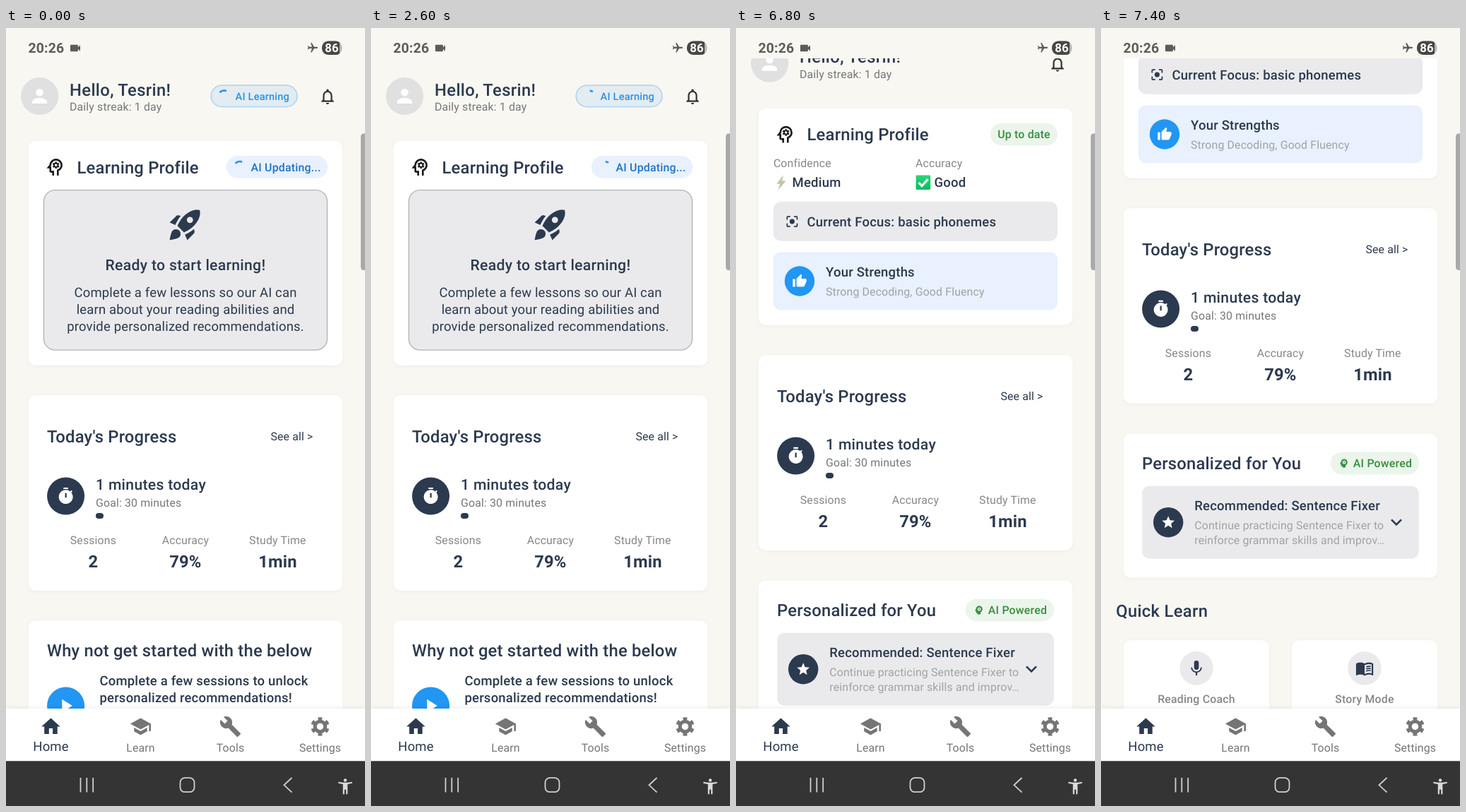
These frames come from a looping animation (508x1102 px, 8000 ms). An HTML page:

```html
<!DOCTYPE html>
<html lang="en">
<head>
<meta charset="utf-8">
<title>Learning dashboard</title>
<style>
html, body { margin: 0; width: 100%; height: 100%; overflow: hidden; background: #f8f7f2; }
svg { display: block; }
#stage { width: 508px; height: 1102px; font-family: Roboto, "Noto Sans", sans-serif; }
text { fill: #2c3a4f; white-space: pre; letter-spacing: .15px; text-rendering: geometricPrecision; }
.t18, .t16, .t14, .t12m, .t11 { font-weight: 500; letter-spacing: .2px; }
.t18 { font-size: 23.81px; }
.t16 { font-size: 21.17px; letter-spacing: .3px; }
.t14, .b14 { font-size: 18.52px; }
.t12m, .b12 { font-size: 15.875px; }
.t11 { font-size: 14.55px; }
.bold { font-weight: 700; font-size: 23.81px; }
.mid { text-anchor: middle; }
.dim { fill: #858788; }
.sub { fill: #757779; }
.pale { fill: #a0a2a5; }
.card { fill: #fff; filter: drop-shadow(0 1.5px 2.5px rgba(0, 0, 0, .045)); }
.grey { fill: #eaeaec; }
.sky { fill: #e8f1fd; }
.mint { fill: #ebf5eb; }
.navy { fill: #2c3a4f; }
.blue { fill: #2196f3; }
.white { fill: #fff; }
.green { fill: #388e3c; }
.idle { fill: #757575; color: #757575; }
#sys { fill: none; stroke: #d0d0d0; stroke-width: 1.8; }
</style>
</head>
<body>
<svg id="stage" viewBox="0 0 508 1102">
<defs>
  <clipPath id="view"><rect y="43" width="508" height="921"/></clipPath>
  <clipPath id="charge"><rect x="447" y="18" width="25" height="21"/></clipPath>
  <linearGradient id="tick" x2="0" y2="1"><stop stop-color="#2bd67b"/><stop offset="1" stop-color="#06bb5f"/></linearGradient>
  <linearGradient id="zap" x2="0" y2="1"><stop stop-color="#c9cf9f"/><stop offset="1" stop-color="#bcb9ae"/></linearGradient>
  <path id="arc" fill="none" stroke="#2196f3" stroke-width="2.65" stroke-linecap="square"/>

  <symbol id="person" viewBox="0 0 24 24"><circle cx="12" cy="8" r="4"/><path d="M12 14c-2.67 0-8 1.34-8 4v2h16v-2c0-2.66-5.33-4-8-4z"/></symbol>
  <symbol id="bell" viewBox="0 0 24 24"><path d="M12 22c1.1 0 2-.9 2-2h-4c0 1.1.89 2 2 2zm6-6v-5c0-3.07-1.64-5.64-4.5-6.32V4c0-.83-.67-1.5-1.5-1.5s-1.5.67-1.5 1.5v.68C7.63 5.36 6 7.92 6 11v5l-2 2v1h16v-1l-2-2zm-2 1H8v-6c0-2.48 1.51-4.5 4-4.5s4 2.02 4 4.5v6z"/></symbol>
  <symbol id="mind" viewBox="0 0 24 24"><g fill="none" stroke="#1a1a1a">
    <path stroke-width="2" d="M15 21v-5.4c2.4-1 4-3 4-5.6a6 6 0 0 0-12 0L5.1 12.4H7V16c0 .6.4 1 1 1h2v4"/>
    <circle cx="13" cy="10" r="2.1" stroke-width="1.5"/>
    <circle cx="13" cy="10" r="3.2" stroke-width="1.2" pathLength="6" stroke-dasharray=".5" stroke-dashoffset="-.25"/></g></symbol>
  <symbol id="mindfull" viewBox="0 0 24 24">
    <path d="M13 3C9.25 3 6.2 5.94 6.02 9.64L4.1 12.2c-.25.33-.01.8.4.8H6v3c0 1.1.9 2 2 2h1v3h7v-4.68c2.36-1.12 4-3.53 4-6.32 0-3.87-3.13-7-7-7z"/>
    <g fill="none" stroke="#ebf5eb"><circle cx="13" cy="10" r="2.4" stroke-width="2"/>
    <circle cx="13" cy="10" r="3.6" stroke-width="1.2" pathLength="6" stroke-dasharray=".5" stroke-dashoffset="-.25"/></g></symbol>
  <symbol id="rocket" viewBox="0 0 24 24"><path fill-rule="evenodd" d="M9.19 6.35c-2.04 2.29-3.44 5.58-3.57 5.89L2 10.69l4.05-4.05c.47-.47 1.15-.68 1.81-.55l1.33.26zM11.17 17s3.74-1.55 5.89-3.7c5.4-5.4 4.5-9.62 4.21-10.57-.95-.3-5.17-1.19-10.57 4.21C8.55 9.09 7 12.83 7 12.83L11.17 17zm6.48-2.19c-2.29 2.04-5.58 3.44-5.89 3.57L13.31 22l4.05-4.05c.47-.47.68-1.15.55-1.81l-.26-1.33zM9 18c0 .83-.34 1.58-.88 2.12C6.94 21.3 2 22 2 22s.7-4.94 1.88-6.12A3 3 0 0 1 9 18zm4-9a2 2 0 1 1 4 0 2 2 0 0 1-4 0z"/></symbol>
  <symbol id="timer" viewBox="0 0 24 24"><path fill-rule="evenodd" d="M15 1H9v2h6zM11 14h2V8h-2zM19.03 7.39l1.42-1.42c-.43-.51-.9-.99-1.41-1.41l-1.42 1.42A9 9 0 1 0 19.03 7.39z"/></symbol>
  <symbol id="play" viewBox="0 0 24 24"><path d="M8 5v14l11-7z"/></symbol>
  <symbol id="focus" viewBox="0 0 24 24"><circle cx="12" cy="12" r="4"/><path fill="none" stroke="#2c3a4f" stroke-width="2" d="M4 9V5q0-1 1-1h4M15 4h4q1 0 1 1v4M20 15v4q0 1-1 1h-4M9 20H5q-1 0-1-1v-4"/></symbol>
  <symbol id="thumb" viewBox="0 0 24 24"><path d="M1 21h4V9H1v12zm22-11c0-1.1-.9-2-2-2h-6.31l.95-4.57.03-.32c0-.41-.17-.79-.44-1.06L14.17 1 7.59 7.59C7.22 7.95 7 8.45 7 9v10c0 1.1.9 2 2 2h9c.83 0 1.54-.5 1.84-1.22l3.02-7.05c.09-.23.14-.47.14-.73v-2z"/></symbol>
  <symbol id="star" viewBox="0 0 24 24"><path d="M12 17.27L18.18 21l-1.64-7.03L22 9.24l-7.19-.61L12 2 9.19 8.63 2 9.24l5.46 4.73L5.82 21z"/></symbol>
  <symbol id="more" viewBox="0 0 24 24"><path d="M16.59 8.59L12 13.17 7.41 8.59 6 10l6 6 6-6z"/></symbol>
  <symbol id="mic" viewBox="0 0 24 24"><rect x="9" y="2" width="6" height="12" rx="3"/><path d="M17.3 11c0 3-2.54 5.1-5.3 5.1S6.7 14 6.7 11H5c0 3.41 2.72 6.23 6 6.72V21h2v-3.28c3.28-.48 6-3.3 6-6.72z"/></symbol>
  <symbol id="book" viewBox="0 0 24 24"><path fill-rule="evenodd" d="M23 6c-1.4-1.1-3.5-1.5-5.5-1.5S13.45 4.9 12 6c-1.45-1.1-3.55-1.5-5.5-1.5S2.45 4.9 1 6v14.6q.1.6.75.5C3.1 20.45 5.05 20 6.5 20c1.95 0 4.05.4 5.5 1.5 1.35-.85 3.8-1.5 5.5-1.5 1.65 0 3.35.3 4.75 1.05q.65.1.75-.5zM21 18.5c-1.1-.35-2.3-.5-3.5-.5-1.7 0-4.15.65-5.5 1.5V8c1.35-.85 3.8-1.5 5.5-1.5 1.2 0 2.4.15 3.5.5z"/><path fill="none" stroke="#2c3a4f" stroke-width="1.5" d="M14 10.2q2.8-1.2 6-.6M14 12.9q2.8-1.2 6-.6M14 15.6q2.8-1.2 6-.6"/></symbol>
  <symbol id="home" viewBox="0 0 24 24"><path d="M10 20v-6h4v6h5v-8h3L12 3 2 12h3v8z"/></symbol>
  <symbol id="school" viewBox="0 0 24 24"><path d="M5 13.18v4L12 21l7-3.82v-4L12 17zM12 3L1 9l11 6 9-4.91V17h2V9z"/></symbol>
  <symbol id="wrench" viewBox="0 0 24 24"><path d="M22.7 19l-9.1-9.1c.9-2.3.4-5-1.5-6.9-2-2-5-2.4-7.4-1.3L9 6 6 9 1.6 4.7C.4 7.1.9 10.1 2.9 12.1c1.9 1.9 4.6 2.4 6.9 1.5l9.1 9.1c.4.4 1 .4 1.4 0l2.3-2.3c.5-.4.5-1.1.1-1.4z"/></symbol>
  <symbol id="gear" viewBox="0 0 24 24"><g fill="none" stroke="currentColor"><circle cx="12" cy="12" r="5.5" stroke-width="3.8"/>
    <circle cx="12" cy="12" r="8.4" stroke-width="3.2" pathLength="6" stroke-dasharray=".5" stroke-dashoffset="-.25"/></g></symbol>
  <symbol id="video" viewBox="0 0 24 24"><path d="M17 10.5V7c0-.55-.45-1-1-1H4c-.55 0-1 .45-1 1v10c0 .55.45 1 1 1h12c.55 0 1-.45 1-1v-3.5l4 4v-11z"/></symbol>
  <symbol id="plane" viewBox="0 0 24 24"><path d="M21 16v-2l-8-5V3.5a1.5 1.5 0 0 0-3 0V9l-8 5v2l8-2.5V19l-2 1.5V22l3.5-1 3.5 1v-1.5L13 19v-5.5z"/></symbol>
  <symbol id="access" viewBox="0 0 24 24"><circle cx="12" cy="4" r="2"/><path d="M20.5 6c-2.61.7-5.67 1-8.5 1s-5.89-.3-8.5-1L3 8c1.86.5 4 .83 6 1v13h2v-6h2v6h2V9c2-.17 4.14-.5 6-1z"/></symbol>
</defs>

<rect width="508" height="1102" fill="#f8f7f2"/>

<g clip-path="url(#view)"><g id="page">
  <circle cx="47.6" cy="96.5" r="26.5" fill="#e0e0e0"/>
  <use href="#person" class="white" x="31.7" y="80.6" width="31.75" height="31.75"/>
  <text class="t18" style="letter-spacing:.35px" x="90" y="95.6">Hello, Tesrin!</text>
  <text class="b12 sub" x="90" y="117">Daily streak: 1 day</text>
  <use href="#bell" fill="#333" x="441.8" y="83.8" width="26.5" height="26.5"/>

  <rect id="profile" class="card" x="31.75" y="160" width="444.5" height="318" rx="10.6"/>
  <use href="#mind" x="53.5" y="181.1" width="31.75" height="31.75"/>
  <text class="t18" x="100.5" y="205.6">Learning Profile</text>

  <g id="before">
    <rect x="290.2" y="81.2" width="121.8" height="30.4" rx="15.2" fill="#e3ecf0" stroke="#a3cdf0" stroke-width="1.3"/>
    <use href="#arc" x="308.5" y="96.5"/>
    <text class="t11" x="324.6" y="101.6" style="fill:#2b91e4">AI Learning</text>
    <rect class="sky" x="312" y="181" width="143" height="31.7" rx="15.85"/>
    <use href="#arc" x="330.7" y="197"/>
    <text class="t12m" x="346.5" y="202.5" style="fill:#2074c4">AI Updating...</text>

    <rect class="grey" x="53.5" y="229.6" width="401" height="226.6" rx="15.9" stroke="#b0b3b6" stroke-width="1.3"/>
    <use href="#rocket" class="navy" x="227.2" y="252" width="52.9" height="52.9"/>
    <text class="t16 mid" x="254" y="343">Ready to start learning!</text>
    <g class="mid">
      <text class="b14" x="254" y="381">Complete a few lessons so our AI can</text>
      <text class="b14" x="254" y="405">learn about your reading abilities and</text>
      <text class="b14" x="254" y="429">provide personalized recommendations.</text>
    </g>

    <rect class="card" x="31.75" y="839.5" width="444.5" height="204" rx="10.6"/>
    <text class="t18" x="58" y="889.6">Why not get started with the below</text>
    <circle class="blue" cx="84.6" cy="960" r="26.5"/>
    <use href="#play" class="white" x="68.7" y="944.1" width="31.75" height="31.75"/>
    <text class="t14" x="132.4" y="931">Complete a few sessions to unlock</text>
    <text class="t14" x="132.4" y="955">personalized recommendations!</text>
  </g>

  <g id="after">
    <rect class="mint" x="360" y="181" width="95" height="31.7" rx="15.85"/>
    <text class="t12m green mid" x="407.5" y="202.5" style="fill:#388e3c">Up to date</text>
    <text class="b12 dim" x="52.9" y="243.8">Confidence</text>
    <text class="b12 dim" x="254" y="243.8">Accuracy</text>
    <path fill="url(#zap)" d="M67 254.5l-9.5 12.5h5l-3 9 11-13.2h-5.2z"/>
    <text class="t14" x="79.5" y="271.5">Medium</text>
    <rect x="254.6" y="254.8" width="20.6" height="20.6" rx="1.5" fill="url(#tick)"/>
    <path d="M258.6 265.4l4.4 4.6 8.6-9.6" fill="none" stroke="#fff" stroke-width="3.2"/>
    <text class="t14" x="280.4" y="271.5">Good</text>

    <rect class="grey" x="52.9" y="292.5" width="402.1" height="55.5" rx="10.6"/>
    <use href="#focus" class="navy" x="68.8" y="309.8" width="21.2" height="21.2"/>
    <text class="t14" x="100.4" y="327">Current Focus: basic phonemes</text>

    <rect class="sky" x="52.9" y="363.8" width="402.1" height="82" rx="10.6"/>
    <circle class="blue" cx="90" cy="404.8" r="21.2"/>
    <use href="#thumb" class="white" x="79.4" y="394.2" width="21.2" height="21.2"/>
    <text class="t14" x="127" y="398.6">Your Strengths</text>
    <text class="b12 pale" x="127" y="425">Strong Decoding, Good Fluency</text>

    <rect class="card" x="31.75" y="829" width="444.5" height="204" rx="10.6"/>
    <text class="t18" x="58" y="879.4">Personalized for You</text>
    <rect class="mint" x="325" y="855" width="125" height="31.7" rx="15.85"/>
    <use href="#mindfull" class="green" x="335.5" y="862.9" width="15.9" height="15.9"/>
    <text class="t12m" x="356.8" y="876.3" style="fill:#388e3c">AI Powered</text>
    <rect class="grey" x="58.2" y="903" width="391.6" height="103" rx="10.6"/>
    <circle class="navy" cx="95.2" cy="954.5" r="21.2"/>
    <use href="#star" class="white" x="84.6" y="943.9" width="21.2" height="21.2"/>
    <text class="t14" x="132.3" y="937.4">Recommended: Sentence Fixer</text>
    <text class="b12 pale" x="132.3" y="964">Continue practicing Sentence Fixer to</text>
    <text class="b12 pale" x="132.3" y="985.3">reinforce grammar skills and improv…</text>
    <use href="#more" class="navy" x="402.1" y="938.4" width="31.75" height="31.75"/>

    <text class="t18" style="letter-spacing:.3px" x="21.2" y="1088.4">Quick Learn</text>
    <rect class="card" x="31.75" y="1121.5" width="206.4" height="120" rx="10.6"/>
    <rect class="card" x="269.9" y="1121.5" width="206.4" height="120" rx="10.6"/>
    <circle class="grey" cx="135" cy="1161.2" r="23.8"/>
    <circle class="grey" cx="373" cy="1161.2" r="23.8"/>
    <use href="#mic" class="navy" x="121.8" y="1148" width="26.5" height="26.5"/>
    <use href="#book" class="navy" x="359.8" y="1148" width="26.5" height="26.5"/>
    <text class="t12m dim mid" x="135" y="1210.3">Reading Coach</text>
    <text class="t12m dim mid" x="373" y="1210.3">Story Mode</text>
  </g>

  <g id="progress">
    <rect class="card" x="31.75" y="520.3" width="444.5" height="276.7" rx="10.6"/>
    <text class="t18" x="58" y="587.2">Today's Progress</text>
    <text class="b12" x="374.4" y="584">See all &gt;</text>
    <circle class="navy" cx="84.6" cy="663" r="26.5"/>
    <use href="#timer" class="white" x="71.4" y="649.8" width="26.5" height="26.5"/>
    <text class="t16" x="127" y="654.4">1 minutes today</text>
    <text class="b12 sub" x="127" y="678">Goal: 30 minutes</text>
    <rect class="navy" x="127" y="687" width="11" height="8" rx="4"/>
    <g class="mid">
      <text class="b12 dim" x="123.4" y="731.2">Sessions</text>
      <text class="b12 dim" x="253.9" y="731.2">Accuracy</text>
      <text class="b12 dim" x="384.4" y="731.2">Study Time</text>
      <text class="bold" x="123.4" y="764.3">2</text>
      <text class="bold" x="253.9" y="764.3">79%</text>
      <text class="bold" x="384.4" y="764.3">1min</text>
    </g>
  </g>
</g></g>

<g fill="#5d5c59">
  <text x="31.5" y="35" style="font-size:19.4px;font-weight:700;fill:#5d5c59">20:26</text>
  <use href="#video" x="88.7" y="19.2" width="18.6" height="18.6"/>
  <use href="#plane" x="425.5" y="19.7" width="17" height="17" transform="rotate(90 434 28.2)"/>
  <rect x="447" y="18.5" width="28.5" height="19.5" rx="9" fill="#b9b8b4"/>
  <rect x="447" y="18.5" width="28.5" height="19.5" rx="9" fill="#484846" clip-path="url(#charge)"/>
  <text class="mid" x="461" y="34.3" style="font-size:16.8px;font-weight:700;fill:#fff">86</text>
</g>

<rect y="964" width="508" height="75" fill="#fff" style="filter:drop-shadow(0 -1px 3px rgba(0,0,0,.07))"/>
<use href="#home" class="navy" x="47.6" y="973.6" width="31.75" height="31.75"/>
<g class="idle">
  <use href="#school" x="174.6" y="973.6" width="31.75" height="31.75"/>
  <use href="#wrench" x="301.6" y="973.6" width="31.75" height="31.75"/>
  <use href="#gear" x="428.6" y="973.6" width="31.75" height="31.75"/>
</g>
<g class="mid">
  <text class="b14" x="63.5" y="1023.6">Home</text>
  <text class="b12 idle" x="190.5" y="1025">Learn</text>
  <text class="b12 idle" x="317.5" y="1025">Tools</text>
  <text class="b12 idle" x="444.5" y="1025">Settings</text>
</g>

<rect y="1038.3" width="508" height="64" fill="#343434"/>
<g id="sys">
  <path d="M105.5 1062v20.5M114.3 1062v20.5M123.2 1062v20.5M404.5 1062l-11 10.3 11 10.3"/>
  <rect x="246.5" y="1062.2" width="20" height="20" rx="6.5"/>
</g>
<use href="#access" fill="#dadada" x="466.8" y="1061" width="26.5" height="26.5"/>
<path d="M508 149.500h-2q-4 0-4 5v183.500q0 5 4 5h2z" fill="#a9a9a7"/>
</svg>

<script>
const LOOP = 8000, STEP = 100, READY = 3800;
const CYCLE = 1333, TURN = 2222, CYCLE_AT = 157, TURN_AT = -50;
const RADIUS = 7.94;
const el = id => document.getElementById(id);
const clamp = v => Math.min(1, Math.max(0, v));

// cubic-bezier(.4, 0, .2, 1), solved by bisection
function ease(x) {
  let lo = 0, hi = 1;
  for (let i = 0; i < 24; i++) {
    const s = (lo + hi) / 2, r = 1 - s;
    if (1.2 * r * r * s + .6 * r * s * s + s * s * s < x) lo = s; else hi = s;
  }
  return lo * lo * (3 - 2 * lo);
}

// Indeterminate ring: head runs ahead, tail catches up, all slowly turning
function arcPath(t) {
  const p = (t + CYCLE_AT) / CYCLE % 1;
  const head = 270 * ease(clamp(p * 2)), tail = 270 * ease(clamp(p * 2 - 1));
  const from = -90 + tail + TURN_AT + t / TURN * 360 + p * 90;
  const sweep = Math.max(head - tail, 1);
  const at = deg => {
    const a = deg * Math.PI / 180;
    return (RADIUS * Math.cos(a)).toFixed(3) + " " + (RADIUS * Math.sin(a)).toFixed(3);
  };
  return `M${at(from)}A${RADIUS} ${RADIUS} 0 ${sweep > 180 ? 1 : 0} 1 ${at(from + sweep)}`;
}

// Steady drag, then a quadratic slow-down
function scrollAt(t) {
  if (t < 6800) return 0;
  if (t < 7000) return 46.3 + (t - 6800) * .511;
  return 254.3 - 105.8 * (1 - clamp((t - 7000) / 400)) ** 2;
}

function draw(time) {
  const t = Math.floor(time % LOOP / STEP) * STEP;
  const ready = t >= READY;
  el("before").style.display = ready ? "none" : "";
  el("after").style.display = ready ? "" : "none";
  el("profile").setAttribute("height", ready ? 307 : 318);
  el("progress").setAttribute("transform", `translate(0 ${ready ? -10.8 : 0})`);
  el("page").setAttribute("transform", `translate(0 ${-scrollAt(t)})`);
  if (!ready) el("arc").setAttribute("d", arcPath(t));
}

const start = performance.now();
function tick() {
  draw(performance.now() - start);
  requestAnimationFrame(tick);
}
tick();
</script>
</body>
</html>
```
